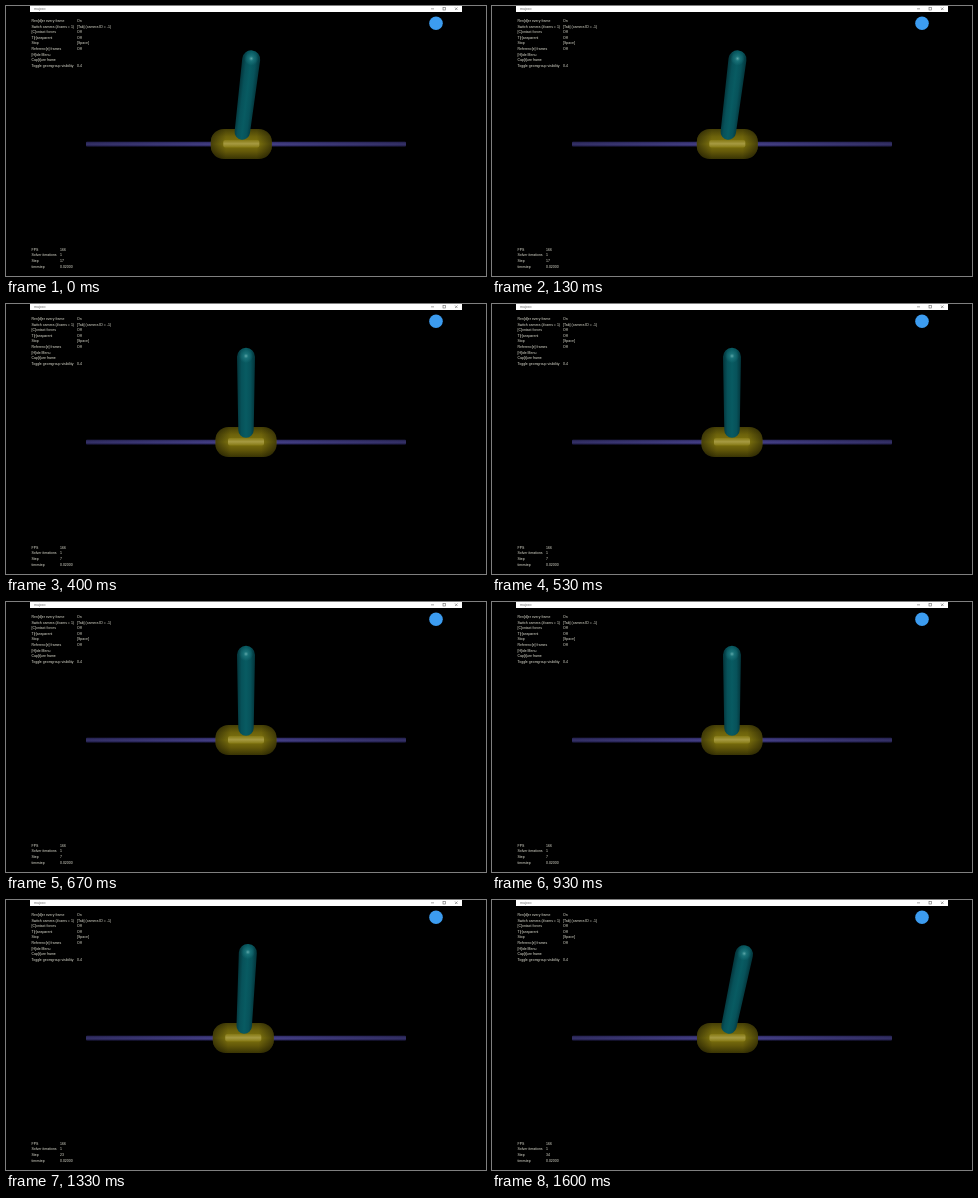
An HTML page with a canvas for the animation above (1.67 s loop, 480 px wide and 270 px high).

```html
<!DOCTYPE html>
<html lang="en">
<head>
<meta charset="utf-8">
<style>
  html, body { margin: 0; width: 100%; height: 100%; overflow: hidden; background: #000; }
  canvas { display: block; }
</style>
</head>
<body>
<canvas id="stage" width="480" height="270"></canvas>
<script>
const ctx = document.getElementById('stage').getContext('2d');
const LOOP = 1670, FRAMES = 25;

const menu = [
  ['Ren[d]er every frame', 'On'],
  ['Switch camera (#cams = 1)', '[Tab] (camera ID = -1)'],
  ['[C]ontact forces', 'Off'],
  ['T[r]ansparent', 'Off'],
  ['Stop', '[Space]'],
  ['Referenc[e] frames', 'Off'],
  ['[H]ide Menu', ''],
  ['Cap[t]ure frame', ''],
  ['Toggle geomgroup visibility', '0-4'],
];

function gradient(x0, y0, x1, y1, ...colors) {
  const g = ctx.createLinearGradient(x0, y0, x1, y1);
  colors.forEach((c, i) => g.addColorStop(i / (colors.length - 1), c));
  return g;
}

function rounded(x, y, w, h, r, fill) {
  ctx.beginPath();
  ctx.roundRect(x, y, w, h, r);
  ctx.fillStyle = fill;
  ctx.fill();
}

function table(rows, y, valueX) {
  ctx.font = '3.5px "Liberation Sans", Arial, sans-serif';
  ctx.fillStyle = '#e6e6d8';
  rows.forEach(([label, value], i) => {
    ctx.fillText(label, 25.5, y + i * 5.6);
    ctx.fillText(value, valueX, y + i * 5.6);
  });
}

function drawWindow() {
  ctx.fillStyle = '#fff';
  ctx.fillRect(24, 0, 432, 6);
  ctx.fillStyle = '#666';
  ctx.font = '3.6px "Liberation Sans", Arial, sans-serif';
  ctx.fillText('mujoco', 28, 4);
  ctx.fillRect(425, 2.6, 3, 0.6);
  ctx.strokeStyle = '#666';
  ctx.lineWidth = 0.6;
  ctx.strokeRect(437, 1.5, 2.5, 2.5);
  ctx.beginPath();
  ctx.moveTo(449, 1.5); ctx.lineTo(451.5, 4);
  ctx.moveTo(451.5, 1.5); ctx.lineTo(449, 4);
  ctx.stroke();
  rounded(423.2, 10.4, 13.6, 13.6, 6.8, '#3c9cf0');
}

function drawRail() {
  rounded(80, 135.8, 320, 4.8, 1, gradient(0, 135.8, 0, 140.6, '#2f2b66', '#4a4590', '#27235a'));
  rounded(80, 135.8, 320, 4.8, 1, gradient(80, 0, 400, 0, '#0004', '#0000', '#0004'));
}

function drawCart(x) {
  rounded(x - 30.5, 123, 61, 30, 13, gradient(0, 123, 0, 153, '#453f06', '#6c620b', '#82770f', '#645909', '#393404'));
  rounded(x - 30.5, 123, 61, 30, 13, gradient(x - 30.5, 0, x + 30.5, 0, '#0007', '#0000', '#0000', '#0000', '#0007'));
  rounded(x - 18, 134, 36, 7.5, 2, gradient(0, 134, 0, 141.5, '#857914', '#a69a42', '#857914'));
}

function drawPole(x, lean) {
  const length = 74;
  ctx.save();
  ctx.translate(x, 126);
  ctx.rotate(Math.asin(lean / length));
  ctx.beginPath();
  ctx.arc(0, -length + 0.8, 9, Math.PI, 0);
  ctx.arc(0, 0, 7.7, 0, Math.PI);
  ctx.closePath();
  ctx.fillStyle = gradient(-9, 0, 9, 0, '#03343a', '#07525a', '#085b62', '#07525a', '#03343a');
  ctx.fill();
  const shine = ctx.createRadialGradient(0, -length, 0, 0, -length, 7);
  shine.addColorStop(0, '#5fa9aa');
  shine.addColorStop(0.35, '#217d83aa');
  shine.addColorStop(1, '#217d8300');
  ctx.fillStyle = shine;
  ctx.fillRect(-7, -length - 7, 14, 14);
  ctx.restore();
}

// Leaning run, reset to upright, then a fall that speeds up.
function pose(t) {
  if (t < 400) return { cart: 235.3, base: 236.3, lean: 9 + t / 500, step: 17 };
  const fall = Math.max(0, t - 930) / 670;
  return {
    cart: 240 - 4.5 * fall,
    base: 240 - 3 * fall,
    lean: 15 * fall ** 2.8,
    step: Math.round(7 + 27 * fall),
  };
}

function draw(now) {
  const frame = Math.floor(now % LOOP / LOOP * FRAMES + 0.12);
  const { cart, base, lean, step } = pose(frame % FRAMES * LOOP / FRAMES);
  ctx.fillStyle = '#000';
  ctx.fillRect(0, 0, 480, 270);
  drawRail();
  drawCart(cart);
  drawPole(base, lean);
  drawWindow();
  table(menu, 15.9, 71);
  table([['FPS', '166'], ['Solver iterations', '1'], ['Step', step], ['timestep', '0.02000']], 244.8, 54);
  requestAnimationFrame(draw);
}

requestAnimationFrame(draw);
</script>
</body>
</html>
```
